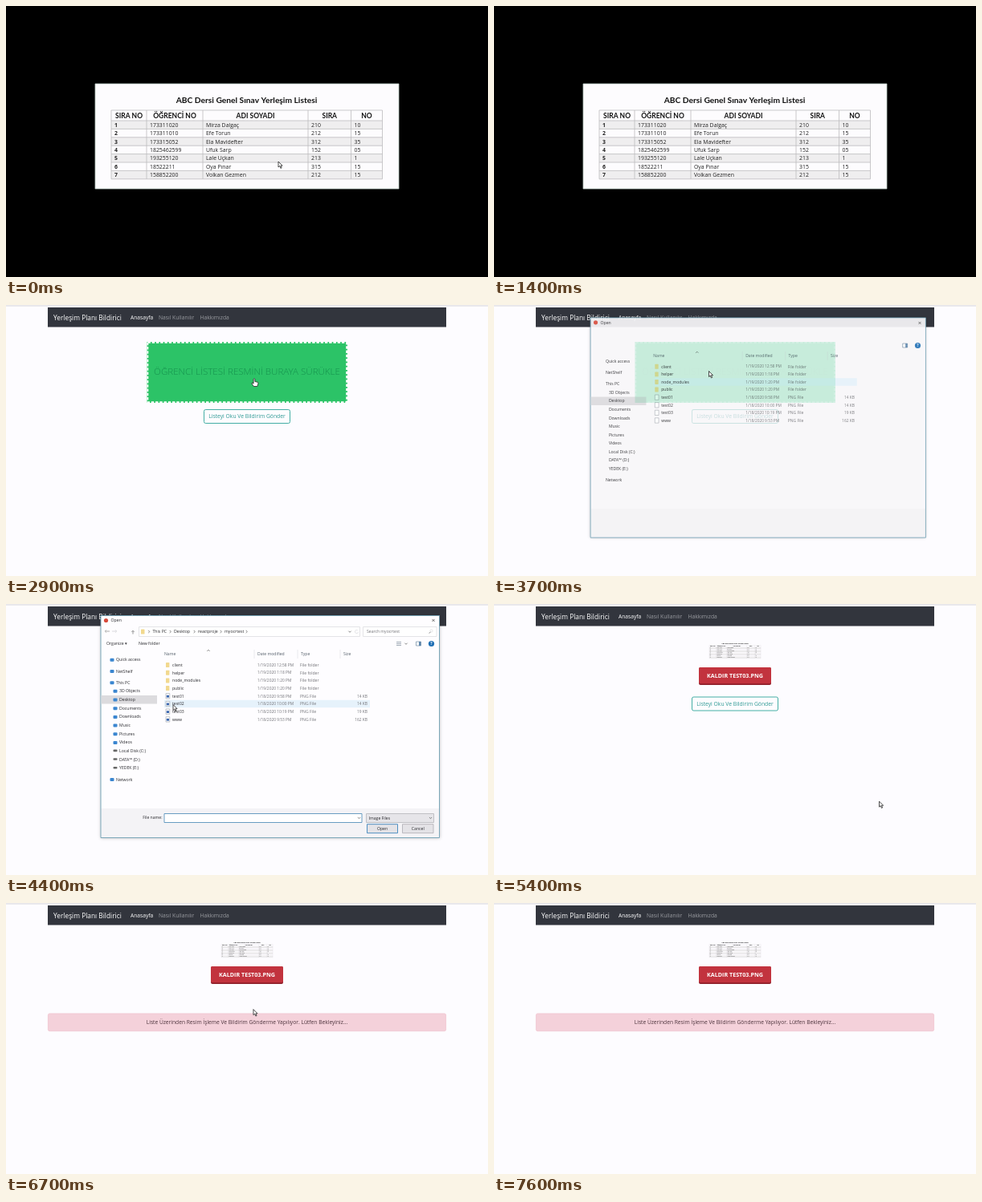
Recreate the animation shown at these times as an HTML page with a canvas. Size 600 by 338 pixels, loop 8 s.

```html
<!DOCTYPE html>
<html lang="tr">
<head>
<meta charset="utf-8">
<style>
html, body { margin: 0; overflow: hidden; background: #000; }
canvas { display: block; width: 600px; height: 338px; }
</style>
</head>
<body>
<canvas id="stage" width="600" height="338"></canvas>
<script>
const ctx = document.getElementById('stage').getContext('2d');
const LOOP = 8000, STEP = 100;
const SANS = '"Open Sans", "Noto Sans", sans-serif';
const LATO = 'Lato, "Open Sans", sans-serif';
const PAGE = '#fdfcff', DARK = '#2b2b2f', GREY = '#737378', BLUE = '#3a86d0';

// ---------- helpers ----------
// y is the middle of the capital letters
function text(s, x, y, size, color, { align = 'left', weight = 400, font = SANS } = {}) {
  ctx.font = `${weight} ${size}px ${font}`;
  ctx.textAlign = align;
  ctx.fillStyle = color;
  ctx.fillText(s, x, y + size * 0.36);
}

function rect(x, y, w, h, fill, stroke, radius = 0, line = 1) {
  ctx.beginPath();
  ctx.roundRect(x, y, w, h, radius);
  if (fill) { ctx.fillStyle = fill; ctx.fill(); }
  if (stroke) { ctx.strokeStyle = stroke; ctx.lineWidth = line; ctx.stroke(); }
}

function line(x1, y1, x2, y2, color, width = 0.8) {
  ctx.strokeStyle = color;
  ctx.lineWidth = width;
  ctx.beginPath();
  ctx.moveTo(x1, y1);
  ctx.lineTo(x2, y2);
  ctx.stroke();
}

function dot(x, y, r, color) {
  ctx.fillStyle = color;
  ctx.beginPath();
  ctx.arc(x, y, r, 0, 7);
  ctx.fill();
}

// small open arrowhead, pointing down when turn is 0
function chevron(x, y, turn = 0, color = '#666') {
  ctx.save();
  ctx.translate(x, y);
  ctx.rotate(turn * Math.PI / 2);
  line(-1.6, -0.8, 0, 0.8, color);
  line(0, 0.8, 1.6, -0.8, color);
  ctx.restore();
}

function layer(alpha, draw) {
  ctx.save();
  ctx.globalAlpha *= alpha;
  draw();
  ctx.restore();
}

const ramp = (t, from, to) => Math.max(0, Math.min(1, (t - from) / (to - from)));

// ---------- seating table ----------
const COLS = [131, 175, 245, 376, 429.5, 468.5];
const HEADS = ['SIRA NO', 'ÖĞRENCİ NO', 'ADI SOYADI', 'SIRA', 'NO'];
const STUDENTS = `173311020,Mirza Dalgaç,210,10
173311010,Efe Torun,212,15
173315052,Ela Mavidefter,312,35
1825462599,Ufuk Sarp,152,05
193255120,Lale Uçkan,213,1
18522211,Oya Pınar,315,15
158852200,Volkan Gezmen,212,15`.split('\n');

function table() {
  const left = COLS[0], right = COLS[5], top = 143, rowH = 10.4, bottom = top + rowH * 7;
  const title = { weight: 700, font: LATO, align: 'center' };
  text('ABC Dersi Genel Sınav Yerleşim Listesi', 299.5, 117, 10.25, '#111', title);
  STUDENTS.forEach((row, i) => {
    const y = top + i * rowH;
    if (i % 2 === 0) rect(left, y, right - left, rowH, '#efeeef');
    [i + 1, ...row.split(',')].forEach((s, c) =>
      text(s, COLS[c] + 4, y + 5.3, 6.9, '#222', { weight: c ? 400 : 700 }));
  });
  for (const x of COLS) line(x, 130, x, bottom, '#bdbcbe');
  for (const y of [130, ...STUDENTS.map((_, i) => top + i * rowH), bottom]) line(left, y, right, y, '#bdbcbe');
  HEADS.forEach((s, c) => text(s, (COLS[c] + COLS[c + 1]) / 2, 136.7, 8.5, '#111', title));
}

function photo() {
  rect(0, 0, 600, 338, '#000');
  rect(111, 97, 378, 131, '#fdfcfe', '#b9c9c2', 0, 0.8);
  table();
}

// ---------- web page ----------
function dropZone(hover) {
  rect(175.5, 46, 249.5, 76, hover ? '#2cc367' : null);
  ctx.setLineDash([3.5, 1.75]);
  rect(176.4, 46.9, 247.7, 74.2, null, hover ? '#fff' : '#2cc367', 0, 1.8);
  ctx.setLineDash([]);
  text('ÖĞRENCİ LİSTESİ RESMİNİ BURAYA SÜRÜKLE', 300, 83, 11.6, hover ? '#15904d' : '#15824b',
    { align: 'center', weight: 300 });
}

function sendButton(y, hover) {
  rect(246.5, y + 0.5, 107, 17, hover ? '#2fa59b' : PAGE, '#2fa59b', 2, 0.9);
  text('Listeyi Oku Ve Bildirim Gönder', 300, y + 9, 6.78, hover ? '#fff' : '#2f9a94', { align: 'center' });
}

function preview() {
  ctx.save();
  ctx.translate(243.1, 26.8);
  ctx.scale(0.19, 0.19);
  table();
  ctx.restore();
  rect(255, 79, 90, 22, '#8f202b', null, 2);
  rect(255, 79, 90, 20.3, '#c2333e', null, 2);
  text('KALDIR TEST03.PNG', 300, 89.7, 7.16, '#fff', { align: 'center', weight: 700 });
}

function page(t, cur) {
  rect(0, 0, 600, 338, PAGE);
  rect(0, 0.5, 600, 1, '#d6d5d9');
  rect(52, 3, 496, 24.5, '#32353d');
  text('Yerleşim Planı Bildirici', 59, 16, 8.35, '#fff');
  text('Anasayfa', 155, 16, 6.7, '#fff');
  text('Nasıl Kullanılır', 190, 16, 6.7, '#9a9ca1');
  text('Hakkımızda', 241.5, 16, 6.7, '#9a9ca1');

  const over = (x, y, w, h) => cur && cur.x > x && cur.x < x + w && cur.y > y && cur.y < y + h;
  if (t < 5000) {
    dropZone(t < 4900 && over(175, 46, 250, 76));
    sendButton(130, over(246, 130, 108, 18));
    return;
  }
  preview();
  if (t < 6700) return sendButton(115.5, over(246, 116, 108, 17));
  rect(52.4, 137.9, 495.2, 21.8, '#f4d1da', '#f0c5d0', 2, 0.8);
  text('Liste Üzerinden Resim İşleme Ve Bildirim Gönderme Yapılıyor. Lütfen Bekleyiniz...',
    300, 149, 6.66, '#4d343d', { align: 'center' });
}

// ---------- file dialog ----------
const ROOTS = ['Quick access', 'NetShelf', 'This PC', 'Network'];
const PLACES = ['Quick access', 'NetShelf', 'This PC', '3D Objects', 'Desktop', 'Documents', 'Downloads',
  'Music', 'Pictures', 'Videos', 'Local Disk (C:)', 'DATA™ (D:)', 'YEDEK (E:)', 'Network'];
const FILES = `client,19/2020 12:58
helper,19/2020 1:18
node_modules,19/2020 1:20
public,19/2020 1:20
test01,18/2020 9:58,14
test02,18/2020 10:00,14
test03,18/2020 10:19,19
www,18/2020 9:53,162`.split('\n');

function places(icons) {
  rect(118.5, 114, 69.5, 10.6, '#dcdbde');
  let y = 55.3;
  for (const name of PLACES) {
    const root = ROOTS.includes(name), drive = name.includes(':');
    y += root ? 14.2 : 10.67;
    const x = root ? 137 : 141;
    layer(icons, () => rect(x - 7.5, y - 1.7, 5, drive ? 2.6 : 4, drive ? '#666' : BLUE, null, 1));
    text(name, x, y, 5.15, DARK);
  }
}

function files(active, chosen, icons) {
  const cols = { Name: 197, 'Date modified': 313, Type: 367, Size: 420 };
  for (const [s, x] of Object.entries(cols)) {
    text(s, x, 62.5, 5.1, '#56606b');
    if (x > 197) line(x - 4, 57, x - 4, 68, '#e6e5e9');
  }
  chevron(252, 58, 2);
  FILES.forEach((row, i) => {
    const y = 76 + i * 9.7, [name, date, size] = row.split(',');
    if (i === active) rect(197, y - 4.8, 256, 9.6, chosen ? '#cce8fb' : '#e6f2fb');
    if (size) {
      rect(199, y - 3.2, 4.8, 6.4, '#fff', '#9aa0a8', 0, 0.6);
      layer(icons, () => rect(199.8, y - 1, 3.2, 2.8, '#3c68b0'));
    } else rect(199, y - 3, 4.4, 6, '#f2d98f', null, 0.6);
    text(name, 207, y, 5.1, DARK);
    text(`1/${date} PM`, 313, y, 4.85, GREY);
    text(size ? 'PNG File' : 'File folder', 366, y, 5.1, GREY);
    if (size) text(size + ' KB', 450, y, 4.9, GREY, { align: 'right' });
  });
}

function field(x, y, w, fill, stroke, label, align = 'left') {
  rect(x, y, w, 11, fill, stroke, 0, 0.9);
  text(label, align === 'center' ? x + w / 2 : x + 3, y + 5.4, 5.15, DARK, { align });
}

function bars(fileName) {
  for (const [x, turn, color] of [[124, 1, '#999'], [137, 3, '#cfced3'], [158, 2, '#777']]) {
    chevron(x, 34, turn, color);
    if (turn === 2) line(x, 33.5, x, 37.5, color);
    else line(x, 34, x + 5 * (2 - turn), 34, color);
  }
  rect(165.5, 28.5, 275, 12, '#fff', '#dedde1', 0, 0.8);
  rect(168, 31.5, 4.5, 6, '#f2d98f', null, 0.6);
  const crumbs = { 'This PC': 182.5, Desktop: 209, reactproje: 239, myocrtest: 272, '': 304 };
  for (const [s, x] of Object.entries(crumbs)) {
    chevron(x - 4.5, 34.5, 3);
    text(s, x, 34.3, 5.2, DARK);
  }
  chevron(428, 34.5);
  ctx.beginPath();
  ctx.arc(436.5, 34.5, 2.1, 0.2, 5.4);
  ctx.stroke();
  rect(444.5, 28.5, 91.5, 12, '#fff', '#dedde1', 0, 0.8);
  text('Search myocrtest', 449, 34.3, 5.1, GREY);
  ctx.beginPath();
  ctx.arc(529.5, 33.5, 1.6, 0, 7);
  ctx.stroke();
  line(528.4, 34.8, 526.8, 36.6, '#666');

  text('Organize ▾', 125, 49.5, 5.2, DARK);
  text('New folder', 165, 49.5, 5.2, DARK);
  for (const y of [47.5, 49.5, 51.5]) line(486, y, 492, y, '#8a97a5');
  chevron(498, 49.5);

  text('File name:', 194.5, 266.5, 5.1, DARK, { align: 'right' });
  field(197, 261.5, 246, '#fff', '#5a93bd', fileName);
  field(448.5, 261.5, 84, '#e6e5e9', '#bcbbc0', 'Image Files');
  for (const x of [439.5, 528.5]) chevron(x, 266.8);
  field(449.5, 274.7, 38, fileName ? '#dcebf7' : '#e4e3e7', '#3f86bd', 'Open', 'center');
  field(493.5, 274.7, 38.5, '#e4e3e7', '#b5b4b9', 'Cancel', 'center');
}

function dialog(t) {
  const open = ramp(t, 3500, 3800), ready = ramp(t, 3700, 3900);
  const closing = t < 4900 ? 0 : ramp(t, 4800, 5100);
  const chosen = t >= 4500;
  const active = chosen ? 6 : 2 + Math.floor(3.9 * ramp(t, 3600, 4400));
  const scale = 0.97 + 0.03 * open;
  layer(Math.min(1, 0.3 + open * 0.9) * (1 - closing), () => {
    ctx.translate(329, 153);
    ctx.scale(scale, scale);
    ctx.translate(-329, -153);
    ctx.shadowColor = 'rgba(0,0,0,.25)';
    ctx.shadowBlur = 4;
    rect(118, 14.5, 421.5, 277, '#fefdff');
    ctx.shadowBlur = 0;
    rect(118.5, 255, 421, 36.5, '#f4f3f6');
    rect(118, 14.5, 421.5, 277, null, '#6f9fb3', 0, 0.9);
    dot(124.5, 20.5, 2.6, '#d84b3c');
    text('Open', 130.5, 20.5, 5.2, DARK);
    text('×', 532, 20.5, 8, '#444', { align: 'center' });
    rect(510.5, 47, 6, 5, '#fff', '#7f97ad', 0, 0.8);
    rect(514, 47, 2.5, 5, '#5c86ad');
    dot(529.5, 49.5, 3.6, '#1f6fb5');
    text('?', 529.5, 49.5, 5, '#fff', { align: 'center', weight: 700 });
    places(ready);
    files(active, chosen, ready);
    layer(ready, () => bars(chosen ? 'test03.png' : ''));
  });
  // the page below shines through while the window opens
  layer(0.17 * (1 - ramp(t, 3700, 4000)), () => {
    ctx.globalCompositeOperation = 'multiply';
    rect(175.5, 46, 249.5, 76, '#2cd387');
    sendButton(130, false);
  });
}

// ---------- pointer ----------
// each run: [time, x, y] stops; hidden outside the runs
const RUNS = [
  [[0, 339, 194], [500, 476, 90], [900, 196, 200], [1400, 76, 280]],
  [[1900, 430, 300], [2700, 302, 82], [2900, 309, 91.5], [3500, 309, 91.5], [3700, 267.5, 82.5],
   [4400, 208, 125.5], [4700, 474, 277], [4900, 474, 277], [5800, 483.5, 224],
   [6600, 312, 127], [7600, 168, 328]],
];

function pointer(t) {
  const run = RUNS.find(r => t >= r[0][0] && t < r[r.length - 1][0]);
  if (!run) return null;
  const i = run.findIndex(k => k[0] > t);
  const [t0, x0, y0] = run[i - 1], [t1, x1, y1] = run[i];
  const p = ramp(t, t0, t1), e = p * p * (3 - 2 * p);
  return { x: x0 + (x1 - x0) * e, y: y0 + (y1 - y0) * e };
}

const ARROW = new Path2D('M0 0V7L1.7 5.5 2.9 8.4 4.1 7.9 2.9 5.2H5.1Z');
const HAND = new Path2D('M-.9 .8Q0-.6 .9 .8V4L4.4 4.8Q5.2 5.2 4.9 6.6L3.8 10H-.6L-3 6.6Q-3.2 5.2-2 5.6L-.9 6.6Z');

function drawPointer(cur, shape) {
  ctx.save();
  ctx.translate(cur.x, cur.y);
  ctx.fillStyle = '#fff';
  ctx.strokeStyle = '#222';
  ctx.lineWidth = 0.8;
  ctx.fill(shape);
  ctx.stroke(shape);
  ctx.restore();
}

// ---------- loop ----------
function frame(now) {
  const t = Math.floor(now % LOOP / STEP) * STEP;
  const cur = pointer(t);
  if (t < 1900) photo();
  else page(t, cur);
  if (t >= 3600 && t < 5100) dialog(t);
  const hand = t >= 2800 && t < 3600 || t >= 6500 && t < 6700;
  if (cur) drawPointer(cur, hand ? HAND : ARROW);
  requestAnimationFrame(frame);
}
requestAnimationFrame(frame);
</script>
</body>
</html>
```
